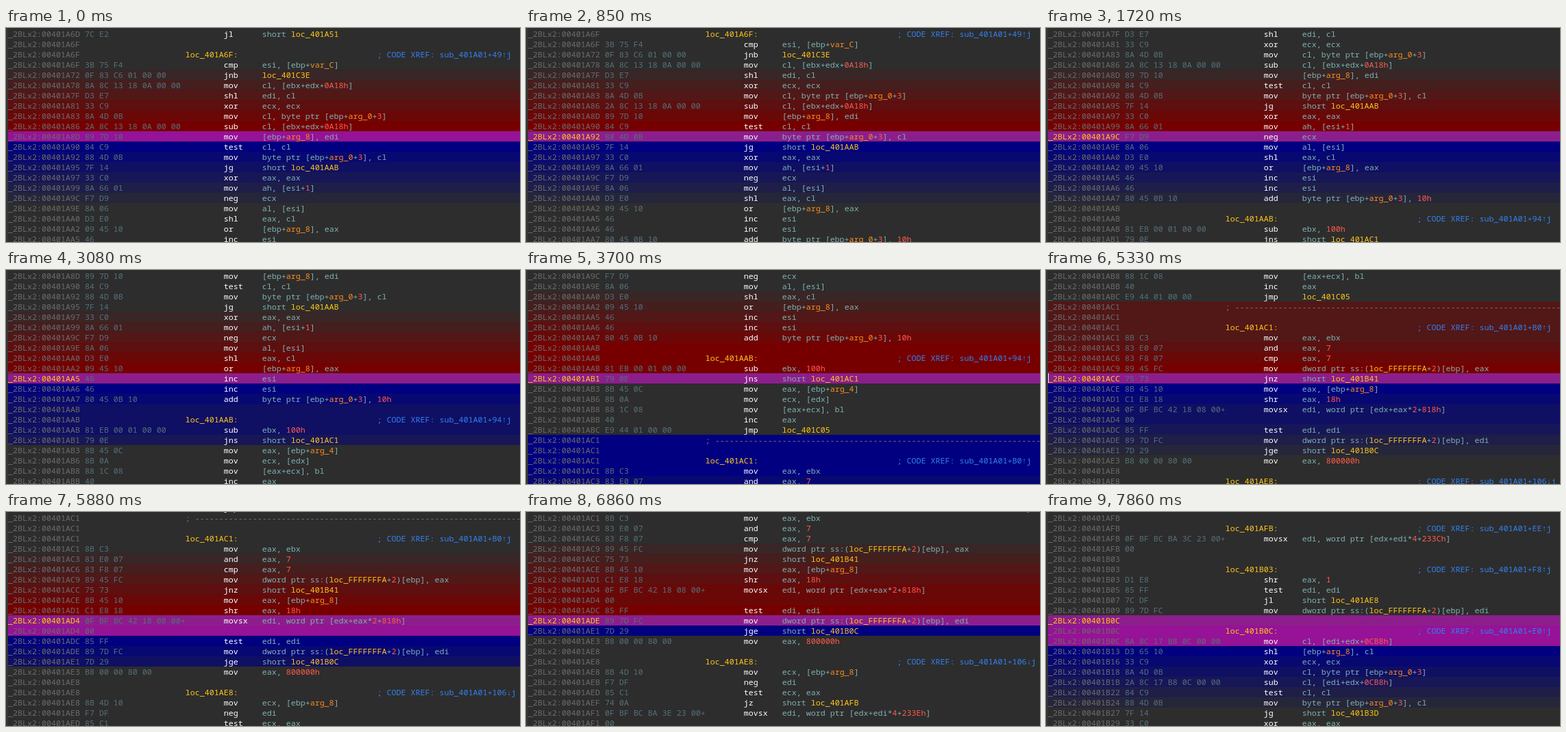
An HTML page that plays this animation: 750 by 313 pixels, repeating every 8000 ms.

```html
<!DOCTYPE html>
<html lang="en">
<head>
<meta charset="utf-8">
<title>Disassembly trace</title>
<style>
  html, body { margin: 0; width: 100%; height: 100%; overflow: hidden; background: #2d2d2d; }
  #stage { position: relative; width: 750px; height: 313px; overflow: hidden; background: #2d2d2d; }
  #gutter { position: absolute; left: 0; top: 0; width: 3px; height: 313px; background: #353535; }
  #listing { position: absolute; left: 3px; top: 1px; width: 747px; }
  .row {
    height: 15px; overflow: hidden; white-space: pre; color: #80b0b0;
    font: 11.667px/15px "Noto Sans Mono", "DejaVu Sans Mono", monospace;
    font-variant-ligatures: none;
  }
  .addr { color: #6c6c6c; }
  .bytes { color: #567079; }
  .op { color: #fff; }
  .loc { color: #ffc61a; }
  .var { color: #ff8c1a; }
  .num { color: #ff5c4d; }
  .note { color: #3282f0; }
  .rule { color: #757575; }
  .here .addr { color: #ffc61a; }
  #caret { position: absolute; left: 3px; top: 151px; width: 1px; height: 14px; background: #fff; }
</style>
</head>
<body>
<div id="stage">
  <div id="listing"></div>
  <div id="gutter"></div>
  <div id="caret"></div>
</div>
<script>
// bytes|mnemonic|operands; "@" is a label with its cross reference, "-" a separator
const CODE = `7C E2|jl|short loc_401A51
@49↑
3B 75 F4|cmp|esi, [ebp+var_C]
0F 83 C6 01 00 00|jnb|loc_401C3E
8A 8C 13 18 0A 00 00|mov|cl, [ebx+edx+0A18h]
D3 E7|shl|edi, cl
33 C9|xor|ecx, ecx
8A 4D 0B|mov|cl, byte ptr [ebp+arg_0+3]
2A 8C 13 18 0A 00 00|sub|cl, [ebx+edx+0A18h]
89 7D 10|mov|[ebp+arg_8], edi
84 C9|test|cl, cl
88 4D 0B|mov|byte ptr [ebp+arg_0+3], cl
7F 14|jg|short loc_401AAB
33 C0|xor|eax, eax
8A 66 01|mov|ah, [esi+1]
F7 D9|neg|ecx
8A 06|mov|al, [esi]
D3 E0|shl|eax, cl
09 45 10|or|[ebp+arg_8], eax
46|inc|esi
46|inc|esi
80 45 0B 10|add|byte ptr [ebp+arg_0+3], 10h
@94↑
81 EB 00 01 00 00|sub|ebx, 100h
79 0E|jns|short loc_401AC1
8B 45 0C|mov|eax, [ebp+arg_4]
8B 0A|mov|ecx, [edx]
88 1C 08|mov|[eax+ecx], bl
40|inc|eax
E9 44 01 00 00|jmp|loc_401C05
-
@B0↑
8B C3|mov|eax, ebx
83 E0 07|and|eax, 7
83 F8 07|cmp|eax, 7
89 45 FC|mov|dword ptr ss:(loc_FFFFFFFA+2)[ebp], eax
75 73|jnz|short loc_401B41
8B 45 10|mov|eax, [ebp+arg_8]
C1 E8 18|shr|eax, 18h
0F BF BC 42 18 08 00 00|movsx|edi, word ptr [edx+eax*2+818h]
85 FF|test|edi, edi
89 7D FC|mov|dword ptr ss:(loc_FFFFFFFA+2)[ebp], edi
7D 29|jge|short loc_401B0C
B8 00 00 80 00|mov|eax, 800000h
@106↓
8B 4D 10|mov|ecx, [ebp+arg_8]
F7 DF|neg|edi
85 C1|test|ecx, eax
74 0A|jz|short loc_401AFB
0F BF BC BA 3E 23 00 00|movsx|edi, word ptr [edx+edi*4+233Eh]
EB 08|jmp|short loc_401B03
-
@EE↑
0F BF BC BA 3C 23 00 00|movsx|edi, word ptr [edx+edi*4+233Ch]
@F8↑
D1 E8|shr|eax, 1
85 FF|test|edi, edi
7C DF|jl|short loc_401AE8
89 7D FC|mov|dword ptr ss:(loc_FFFFFFFA+2)[ebp], edi
@E0↑
8A 8C 17 B8 0C 00 00|mov|cl, [edi+edx+0CB8h]
D3 65 10|shl|[ebp+arg_8], cl
33 C9|xor|ecx, ecx
8A 4D 0B|mov|cl, byte ptr [ebp+arg_0+3]
2A 8C 17 B8 0C 00 00|sub|cl, [edi+edx+0CB8h]
84 C9|test|cl, cl
88 4D 0B|mov|byte ptr [ebp+arg_0+3], cl
7F 14|jg|short loc_401B3D
33 C0|xor|eax, eax`.split("\n");

const LOOP = 8000, ROW = 15, CURRENT_ROW = 10, TRAIL = 6, FIRST_STEP = 8;
const BACK = [45, 45, 45], RED = [118, 0, 0], BLUE = [0, 0, 128];
const STEPS = [680, 830, 1130, 1270, 1570, 1720, 1910, 2590, 2900, 3080, 3210, 3360, 3510,
  3640, 4200, 4710, 4870, 5020, 5330, 5520, 5690, 5880, 6180, 6690, 7180, 7690];
const CARET_ON = [[2210, 2590], [4390, 5520]];
const SKIPPED = [[0x401AB3, 0x401AC1], [0x401AE3, 0x401B0C]];

const listing = document.getElementById("listing");
const caret = document.getElementById("caret");
const rows = [];
const span = (cls, text) => `<span class="${cls}">${text}</span>`;
const within = (ranges, x) => ranges.some(([a, b]) => x >= a && x < b);

function addRow(addr, html = "") {
  const el = document.createElement("div");
  const hex = addr.toString(16).toUpperCase().padStart(8, "0");
  el.className = "row";
  el.innerHTML = span("addr", `_2BLx2:${hex} `) + html;
  listing.append(el);
  rows.push({ addr, el });
}

function paintOperands(text) {
  return text.replace(/(loc_\w+)|((?:arg|var)_\w+)|\b\d[\dA-F]*h?\b/g,
    (word, loc, local) => span(loc ? "loc" : local ? "var" : "num", word));
}

function buildListing() {
  const indent = " ".repeat(21);
  let addr = 0x401A6D;
  for (const line of CODE) {
    if (line === "-") {
      addRow(addr, indent + span("rule", "; " + "-".repeat(80)));
    } else if (line[0] === "@") {
      const name = `loc_${addr.toString(16).toUpperCase()}:`;
      addRow(addr);
      addRow(addr, indent + span("loc", name.padEnd(40)) +
        span("note", `; CODE XREF: sub_401A01+${line.slice(1)}j`));
    } else {
      const [code, op, args] = line.split("|");
      const bytes = code.split(" ");
      const shown = bytes.slice(0, 7).join(" ") + (bytes.length > 7 ? "+" : "");
      addRow(addr, span("bytes", shown.padEnd(29)) + span("op", op.padEnd(8)) + paintOperands(args));
      if (bytes.length > 7) addRow(addr, span("bytes", bytes[7]));
      addr += bytes.length;
    }
  }
}

buildListing();
const path = [...new Set(rows.map(r => r.addr))].filter(a => !within(SKIPPED, a));

function trailColor(offset, moved, top) {
  if (offset === 0) return moved && top ? "#8c1e8c" : "#961296";
  const fade = (Math.abs(offset) - 1) / TRAIL;
  if (fade >= 1) return "";
  const hue = offset < 0 ? RED : BLUE;
  return `rgb(${hue.map((c, i) => Math.round(c + (BACK[i] - c) * fade))})`;
}

function showStep(done) {
  const pos = FIRST_STEP + done;
  const current = rows.findIndex(r => r.addr === path[pos]);
  rows.forEach(({ addr, el }, i) => {
    const at = path.indexOf(addr);
    el.style.background = at < 0 ? "" : trailColor(at - pos, done > 0, i === current);
    el.classList.toggle("here", done > 0 && i === current);
  });
  listing.style.transform = `translateY(${(CURRENT_ROW - current) * ROW}px)`;
}

let shownStep = -1;
function draw() {
  const t = performance.now() % LOOP;
  const done = STEPS.filter(s => s <= t).length;
  if (done !== shownStep) showStep(shownStep = done);
  caret.style.visibility = within(CARET_ON, t) ? "visible" : "hidden";
  requestAnimationFrame(draw);
}
draw();
</script>
</body>
</html>
```
